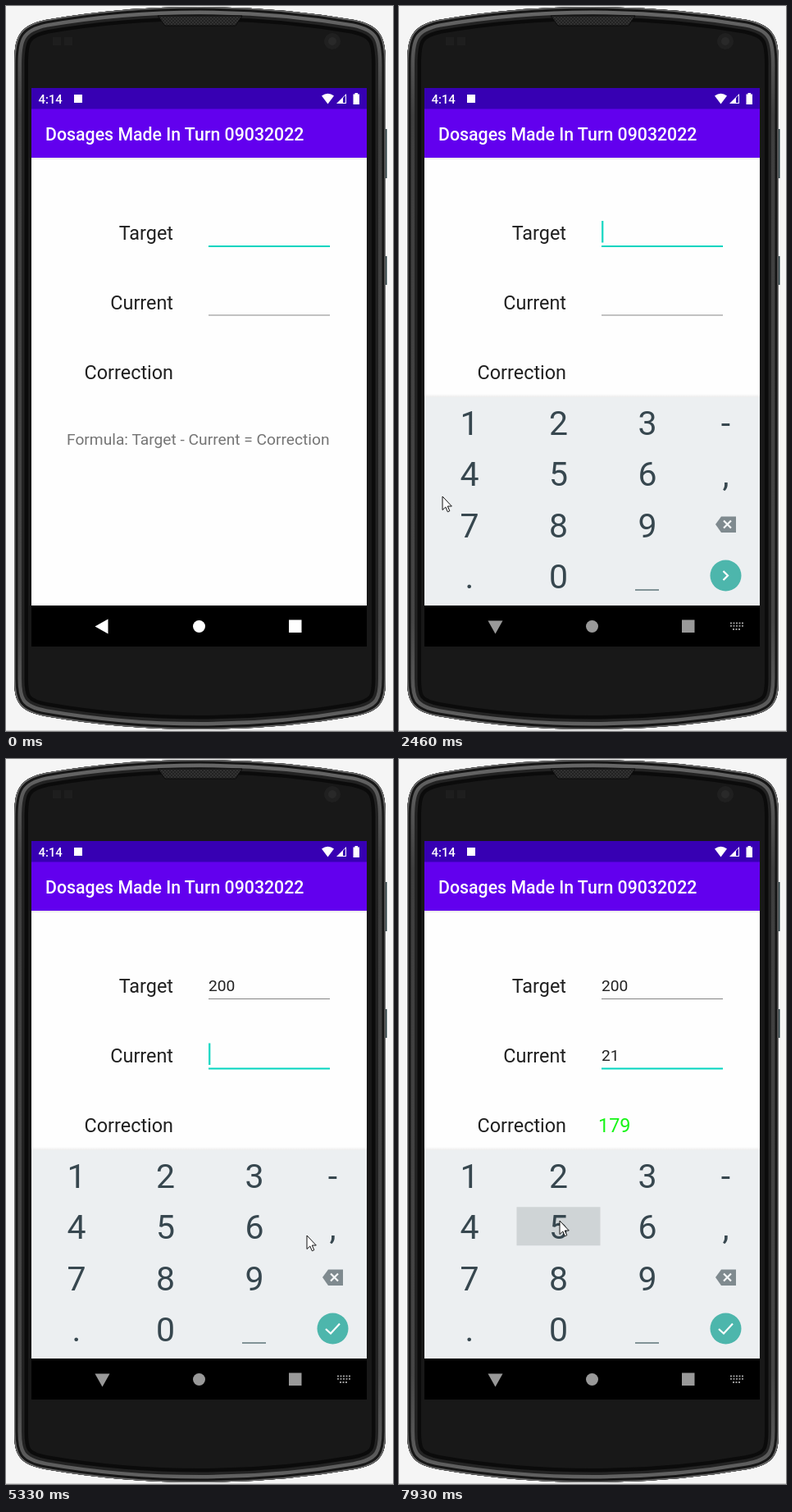
An HTML page that plays this animation: 472 by 884 pixels, repeating every 8000 ms.

```html
<!DOCTYPE html>
<html lang="en">
<head>
<meta charset="utf-8">
<title>Correction calculator</title>
<style>
  html, body { margin: 0; width: 100%; height: 100%; overflow: hidden; background: #f5f5f5; }
  svg { display: block; width: 472px; height: 884px; font-family: Roboto, sans-serif; }
  .label { font-size: 23.4px; fill: #202020; text-anchor: end; }
  .input { font-size: 19.2px; fill: #222; }
  .key { font-size: 41px; fill: #37474f; text-anchor: middle; }
</style>
</head>
<body>
<svg viewBox="0 0 472 884">
  <defs>
    <path id="shell" d="M10 72C10 40 14 24 48 17Q140 1 236.5 1Q333 1 425 17C459 24 463 40 463 72V820C463 846 459 860 425 866Q333 882 236.5 882Q140 882 48 866C14 860 10 846 10 820Z"/>
    <clipPath id="shellClip"><use href="#shell"/></clipPath>
    <clipPath id="screenClip"><path d="M31 100H440V781H31Z"/></clipPath>
    <linearGradient id="rim" x2="0" y2="1">
      <stop stop-color="#686868"/><stop offset=".15" stop-color="#3e3e3e"/>
      <stop offset=".85" stop-color="#454545"/><stop offset="1" stop-color="#626262"/>
    </linearGradient>
    <linearGradient id="shade" x2="0" y2="1">
      <stop stop-color="#000" stop-opacity="0"/><stop offset="1" stop-color="#000" stop-opacity=".07"/>
    </linearGradient>
    <pattern id="mesh" width="4" height="4" patternUnits="userSpaceOnUse">
      <path d="M0 0H4V4H0Z" fill="#222"/><path d="M0 0L4 4M4 0L0 4" stroke="#393939" stroke-width=".7"/>
    </pattern>
  </defs>

  <path d="M0 883.5H472" stroke="#cfcfcf"/>
  <path d="M463.5 150V210M463.5 305V340" stroke="#24383c" stroke-width="2"/>
  <use href="#shell" fill="#181818"/>
  <g clip-path="url(#shellClip)" fill="none">
    <use href="#shell" stroke="#0b0b0b" stroke-width="34"/>
    <use href="#shell" stroke="#222" stroke-width="25"/>
    <use href="#shell" stroke="url(#rim)" stroke-width="18"/>
    <use href="#shell" stroke="#161616" stroke-width="9"/>
    <use href="#shell" stroke="#6c6c6c" stroke-width="3"/>
  </g>
  <path d="M185 12H288L280 24H194Z" fill="url(#mesh)" stroke="#0a0a0a"/>
  <path d="M57 38h10v10h-10zM71 38h10v10h-10z" fill="#1e1e1e"/>
  <circle cx="398" cy="43" r="10" fill="#202020"/><circle cx="398" cy="43" r="5" fill="#292929"/>

  <g clip-path="url(#screenClip)">
    <path d="M31 100H440V781H31Z" fill="#fefefe"/>
    <path d="M31 100H440V126H31Z" fill="#3700b3"/>
    <path d="M31 125.5H440V185H31Z" fill="#6200ee"/>
    <path d="M31 185H440V187H31Z" fill="#eee"/>
    <g fill="#fff">
      <text x="39.5" y="119" font-size="14.9" font-weight="500">4:14</text>
      <path d="M83 108h10v10h-10z"/>
      <path d="M385 109.5Q392.500 104 400 109.500L392.500 119.500Z"/>
      <path d="M403 119L415 107V119Z"/>
      <path d="M411 112V118H414V109Z" fill="#3700b3"/>
      <path d="M425.500 106h3.500v1.500h2v12.500h-7.500v-12.500h2z"/>
      <text x="48" y="164" font-size="21.3" font-weight="500">Dosages Made In Turn 09032022</text>
    </g>
    <text class="label" x="204" y="285">Target</text>
    <text class="label" x="204" y="370">Current</text>
    <text class="label" x="204" y="454.500">Correction</text>
    <text x="74" y="535" font-size="19.200" fill="#757575">Formula: Target - Current = Correction</text>
    <path id="targetLine"/><path id="currentLine"/>
    <text class="input" id="target" x="247" y="283"/>
    <text class="input" id="current" x="247" y="368"/>
    <text id="correction" x="243" y="454.500" font-size="23.400" fill="#16f516"/>
    <path id="caret" d="M0 262V288.500" stroke="#25d9c6" stroke-width="2.400"/>

    <path d="M31 731H440V781H31Z" fill="#000"/>
    <g id="keyboard">
      <path d="M31 473H440V477H31Z" fill="url(#shade)"/>
      <path d="M31 477H440V731H31Z" fill="#eceff1"/>
      <path id="pressed" d="M0 0H102V47H0Z" fill="#cfd4d6"/>
      <g id="keys"></g>
      <path d="M288 712H317" stroke="#667b81" stroke-width="1.600"/>
      <path d="M386 632L393 622.500H411V642H393Z" fill="#7f8a8f"/>
      <path d="M396 627.500l9 9m0-9l-9 9" stroke="#f5f7f8" stroke-width="2.200"/>
      <circle cx="398.500" cy="694.500" r="19" fill="#4db6ac"/>
      <path id="action" fill="none" stroke="#fff" stroke-width="2.200"/>
    </g>
    <g id="nav">
      <path id="back" d="M-9 0L7 -9V9Z"/>
      <circle cx="235.500" cy="756.500" r="7.500"/>
      <path d="M345 748.500h15.500v15.500h-15.500z"/>
    </g>
    <path id="switcher" d="M404 752.500H420M404 755.800H420M407 760H417" stroke="#999" stroke-width="1.800" stroke-dasharray="2 1.500"/>
  </g>
  <path id="pointer" d="M0 0V16.500L3.800 13L6.300 18.800L8.800 17.700L6.300 12H11.300Z" fill="#fff" stroke="#111"/>
</svg>

<script>
const LOOP = 8000;
const $ = id => document.getElementById(id);
const set = (id, attrs) => { for (const name in attrs) $(id).setAttribute(name, attrs[name]); };
const clamp = v => Math.max(0, Math.min(1, v));
const show = (id, on) => set(id, { visibility: on ? 'visible' : 'hidden' });

const columns = [86, 194.5, 303, 398.5];
const rowPitch = 62.3;
['123-', '456,', '789', '.0'].forEach((row, r) => [...row].forEach((char, c) => {
  const key = document.createElementNS('http://www.w3.org/2000/svg', 'text');
  key.setAttribute('class', 'key');
  key.setAttribute('x', columns[c]);
  key.setAttribute('y', 523 + r * rowPitch);
  key.textContent = char;
  $('keys').append(key);
}));

// Each entry: time, target text, current text. Every entry restarts the caret blink.
const inputs = [
  [60, '', ''], [1060, '', ''], [3060, '2', ''], [3700, '20', ''], [4150, '200', ''],
  [4900, '200', ''], [6300, '200', '2'], [7100, '200', '21']
];
// Start, end, column, row
const presses = [
  [2650, 3060, 1, 0], [3600, 3700, 1, 3], [4050, 4150, 1, 3],
  [6150, 6300, 1, 0], [7000, 7100, 0, 0], [7860, LOOP, 1, 1]
];
// Time, x, y
const pointerPath = [
  [60, 20, 858], [600, 251, 272], [1730, 251, 272], [2300, 53, 598], [2460, 53, 598],
  [2570, 190, 523], [3090, 190, 523], [3450, 194, 705], [4250, 194, 705],
  [4640, 398, 690], [4980, 398, 690], [5330, 367, 581], [5600, 345, 600],
  [5950, 197, 523], [6400, 197, 523], [6700, 185, 582], [6740, 185, 582],
  [6970, 84, 515], [7180, 84, 515], [7560, 196, 563], [LOOP, 196, 563]
];

function pointerAt(t) {
  const i = Math.max(1, pointerPath.findIndex(p => p[0] > t));
  const [t0, x0, y0] = pointerPath[i - 1], [t1, x1, y1] = pointerPath[i];
  const p = clamp((t - t0) / (t1 - t0)), e = p * p * (3 - 2 * p);
  return [x0 + (x1 - x0) * e, y0 + (y1 - y0) * e];
}

function underline(id, y, focused) {
  set(id, {
    d: `M247 ${focused ? y + 0.5 : y}H395`,
    stroke: focused ? '#03d5c0' : '#858585',
    'stroke-width': focused ? 2 : 1
  });
}

function draw(t) {
  const input = inputs.findLast(entry => entry[0] <= t);
  const [since, target, current] = input || [0, '', ''];
  const onCurrent = t >= 4900;
  $('target').textContent = target;
  $('current').textContent = current;
  $('correction').textContent = current && target - current;
  underline('targetLine', 292.5, !onCurrent);
  underline('currentLine', 377, onCurrent);

  const typed = onCurrent ? current : target;
  show('caret', input && Math.floor((t - since) / 500) % 2 === 0);
  set('caret', { transform: `translate(${248.2 + typed.length * 10.4} ${onCurrent ? 84.5 : 0})` });

  const rise = clamp((t - 1362) / 285);
  const eased = rise * rise * (3 - 2 * rise);
  set('keyboard', { opacity: rise, transform: `translate(0 ${254 * (1 - (rise < 0.14 ? rise * 0.7 : Math.max(eased, 0.098)))})` });
  const press = presses.find(([start, end]) => t >= start && t < end);
  show('pressed', press);
  if (press) set('pressed', { transform: `translate(${columns[press[2]] - 51} ${484 + press[3] * rowPitch})` });
  set('action', { d: onCurrent ? 'M390 695L396 700.5L407 688.5' : 'M395.5 689L401 694.5L395.5 700' });

  const open = rise === 1;
  const level = 255 - 102 * rise;
  set('nav', { fill: `rgb(${level},${level},${level})` });
  set('back', { transform: `translate(117.5 756.5) rotate(${open ? -90 : 0})` });
  show('switcher', open);

  const [x, y] = pointerAt(t);
  show('pointer', t >= 60);
  set('pointer', { transform: `translate(${x} ${y})` });
}

const began = performance.now();
function tick() {
  draw((performance.now() - began) % LOOP);
  requestAnimationFrame(tick);
}
draw(0);
requestAnimationFrame(tick);
</script>
</body>
</html>
```
